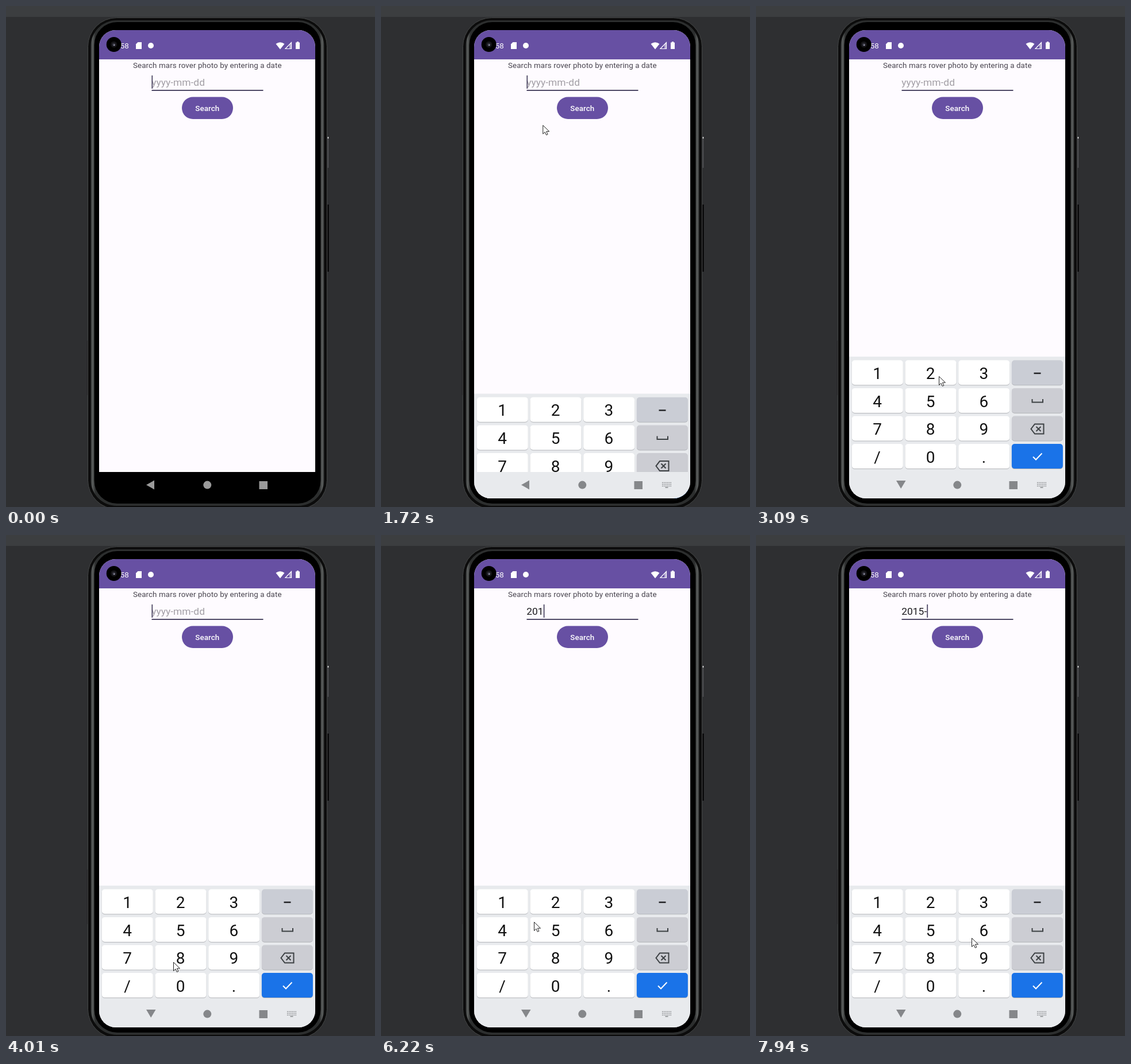
Recreate the animation shown at these times as an HTML page. Size 642 by 873 pixels, loop 8 s.

```html
<!DOCTYPE html>
<html lang="en">
<head>
<meta charset="utf-8">
<title>Rover photo search</title>
<style>
  html, body { margin: 0; height: 100%; overflow: hidden; background: #2e2f31; }
  svg { display: block; font-family: Roboto, sans-serif; }
</style>
</head>
<body>
<svg id="stage" width="642" height="873" viewBox="0 0 642 873">
  <defs>
    <clipPath id="screen"><rect x="162" y="42" width="376" height="816" rx="29"/></clipPath>
    <linearGradient id="rim" x2="1">
      <stop offset="0" stop-color="#2c2e2e"/><stop offset=".007" stop-color="#5c5f5e"/>
      <stop offset=".02" stop-color="#2c2e2e"/><stop offset=".98" stop-color="#2c2e2e"/>
      <stop offset=".993" stop-color="#5c5f5e"/><stop offset="1" stop-color="#2c2e2e"/>
    </linearGradient>
  </defs>

  <rect width="642" height="873" fill="#2e2f31"/>
  <rect width="642" height="19" fill="#3c3e40"/>

  <g id="phone">
    <path d="M560.5 228V282" stroke="#55575a" stroke-width="1.5"/>
    <path d="M560.5 228V231" stroke="#eee" stroke-width="1.5"/>
    <path d="M560.5 346V463" stroke="#000" stroke-width="2"/>
    <path d="M142 583V678" stroke="#18191a"/>
    <rect x="142.5" y="20.5" width="416" height="856" rx="50" fill="#0c0c0c" stroke="#454747"/>
    <rect x="147.5" y="25" width="406" height="846" rx="45" fill="url(#rim)"/>
    <rect x="153.5" y="28" width="394" height="839" rx="40"/>
  </g>

  <g clip-path="url(#screen)">
    <rect x="162" y="42" width="376" height="770" fill="#fefbff"/>
    <rect x="162" y="42" width="376" height="51" fill="#6750a3"/>

    <g fill="#fff">
      <text x="198.7" y="74" font-size="13.4">58</text>
      <path d="M229.5 63H236V75H226V66.5Z"/>
      <circle cx="252" cy="69" r="5"/>
      <path d="M469.5 66Q477 60.5 484.5 66L477 75.5Z"/>
      <path d="M496.5 63.5V74.5H486Z" fill="none" stroke="#fff" stroke-width="1.2"/>
      <path d="M493 68L497 63V75H493Z" fill-opacity=".5"/>
      <path d="M504 63.5H506V62H509V63.5H511V75H504Z"/>
    </g>

    <text x="350.3" y="107.8" font-size="13.4" letter-spacing=".08" text-anchor="middle" fill="#49454f">Search mars rover photo by entering a date</text>
    <text id="hint" x="253.3" y="139.3" font-size="17.4" fill="#a29fa5">yyyy-mm-dd</text>
    <text id="typed" x="253.3" y="139.3" font-size="17.4" fill="#1c1b1f"></text>
    <rect x="253.5" y="146" width="194" height="2" fill="#4f4966"/>
    <rect id="caret" y="121" width="1.8" height="23" fill="#4f4966"/>
    <rect x="306" y="158.5" width="89" height="38.5" rx="19.2" fill="#6750a3"/>
    <text x="350.3" y="182.7" font-size="13.4" font-weight="500" letter-spacing=".1" text-anchor="middle" fill="#fff">Search</text>

    <g id="keyboard">
      <rect x="162" y="611" width="376" height="247" fill="#e8eaed"/>
      <g id="keys"></g>
      <g fill="none" stroke="#3c4043" stroke-width="2">
        <path d="M483.5 640H495.5" stroke="#202124" stroke-width="2.4"/>
        <path d="M480.5 685V690.5H499V685"/>
        <path d="M485 728.5H500.5V745.5H485L478.5 737Z"/>
        <path d="M487.5 733L495.5 741M495.5 733L487.5 741"/>
        <path d="M482 785.5L487 790.5L497.5 779.5" stroke="#fff"/>
      </g>
    </g>

    <rect id="navBar" x="162" y="812" width="376" height="46" fill="#e8eaed"/>
    <g id="nav">
      <path id="back"/>
      <circle cx="350.3" cy="834.6" r="7"/>
      <rect x="440.5" y="828" width="14.5" height="14"/>
      <g id="switcher" fill="none" stroke="currentColor" stroke-width="1.5">
        <path d="M489 830.5H505M489 833.5H505M489 836.5H505" stroke-dasharray="1.6 1.28"/>
        <path d="M494.5 839H499.5"/>
      </g>
    </g>
  </g>

  <circle cx="187.7" cy="67" r="13"/>
  <circle cx="187.7" cy="67" r="5.5" fill="#141417"/>
  <circle cx="187.7" cy="67.3" r="2.8" fill="#34343f"/>
  <circle cx="188.3" cy="68" r="1.2" fill="#9a9aad"/>

  <path id="pointer" d="M.5 .5V15.5L4 12.2L6.3 17.4L8.8 16.3L6.5 11.2H11.5Z" fill="#fff" stroke="#222" stroke-width="1"/>
</svg>

<script>
const LOOP = 8000;
const $ = id => document.getElementById(id);

// Keys, row by row
const keyRects = {};
['1', '2', '3', 'minus', '4', '5', '6', 'space', '7', '8', '9', 'delete', '/', '0', '.', 'enter'].forEach((name, i) => {
  const col = i % 4, row = i >> 2;
  const x = 166.8 + col * 92.7, y = 617.3 + row * 48.6;
  const fill = name === 'enter' ? '#1a73e8' : col < 3 ? '#fff' : row ? '#cccdd3' : '#cacdd5';
  const add = (tag, attrs, text = '') => {
    const el = document.createElementNS('http://www.w3.org/2000/svg', tag);
    for (const key in attrs) el.setAttribute(key, attrs[key]);
    el.textContent = text;
    return $('keys').appendChild(el);
  };
  const box = { x, y, width: 89, height: 43, rx: 5 };
  add('rect', { ...box, y: y + 1, fill: '#b4b6ba' });
  keyRects[name] = add('rect', { ...box, fill });
  if (col < 3) add('text', { x: x + 44.2, y: y + 32.6, 'font-size': 28, 'text-anchor': 'middle', fill: '#111' }, name);
});

// Pointer stops: time, x, y
const stops = [
  [450, 549, 873], [900, 470, 520], [1350, 268, 142], [1580, 268, 142],
  [2240, 381, 699], [2410, 381, 699], [2600, 383, 669], [2800, 383, 669],
  [3080, 318, 645], [3300, 318, 645], [3820, 305, 761], [4000, 291, 744],
  [4090, 291, 745], [4150, 293, 748], [4360, 295, 650], [4740, 295, 650],
  [5080, 318, 821], [5170, 316, 816], [5240, 316, 816], [5420, 310, 788],
  [5640, 310, 788], [6040, 220, 640], [6120, 220, 640], [6220, 266, 674],
  [6280, 266, 674], [6420, 294, 684], [6800, 294, 684], [7400, 492, 640],
  [7640, 492, 640], [7930, 375, 702], [LOOP, 375, 702]
];

// When each character appears
const strokes = [[4740, '2'], [5600, '0'], [6190, '1'], [6830, '5'], [7660, '-']];

const ease = p => p * p * (3 - 2 * p);
const clamp = p => Math.min(1, Math.max(0, p));
const show = (id, on) => $(id).setAttribute('visibility', on ? 'visible' : 'hidden');

function pointerAt(t) {
  const i = stops.findIndex(s => s[0] > t);
  const [t0, x0, y0] = stops[i - 1], [t1, x1, y1] = stops[i];
  const p = ease((t - t0) / (t1 - t0));
  return [x0 + (x1 - x0) * p, y0 + (y1 - y0) * p];
}

function caretOn(t, lastStroke) {
  if (lastStroke) return (t - lastStroke) % 1000 < 510;
  return t < 1500 ? (t + 200) % 1000 < 500 : t < 1540 || (t - 1540) % 1000 < 530;
}

function render(t) {
  const done = strokes.filter(s => s[0] <= t);
  $('typed').textContent = done.map(s => s[1]).join('');
  show('hint', !done.length);
  const width = done.length ? $('typed').getComputedTextLength() : 0;
  $('caret').setAttribute('x', 253.4 + width);
  show('caret', caretOn(t, done.length && done[done.length - 1][0]));

  for (const [time, name] of strokes) {
    const pressed = t > time - 110 && t < time + 10;
    if (keyRects[name]) keyRects[name].setAttribute('fill', pressed ? '#dadce0' : '#fff');
  }

  const keyboardUp = t >= 1620;
  const rise = 1 - (1 - clamp((t - 1620) / 280)) ** 3;
  $('keyboard').setAttribute('transform', `translate(0 ${247 * (1 - rise)})`);
  show('keyboard', keyboardUp);
  show('navBar', keyboardUp);

  const navColor = keyboardUp ? '#85878a' : '#9b9b9b';
  $('nav').setAttribute('fill', navColor);
  $('nav').setAttribute('color', navColor);
  show('switcher', t >= 1450);
  $('back').setAttribute('d', t < 1800 ? 'M244 834.5L258 826.5V842.5Z' : 'M244 827H260.5L252.2 841Z');

  show('pointer', t >= stops[0][0]);
  if (t >= stops[0][0]) $('pointer').setAttribute('transform', `translate(${pointerAt(t)})`);
}

function tick() {
  render(performance.now() % LOOP);
  requestAnimationFrame(tick);
}
tick();
</script>
</body>
</html>
```
